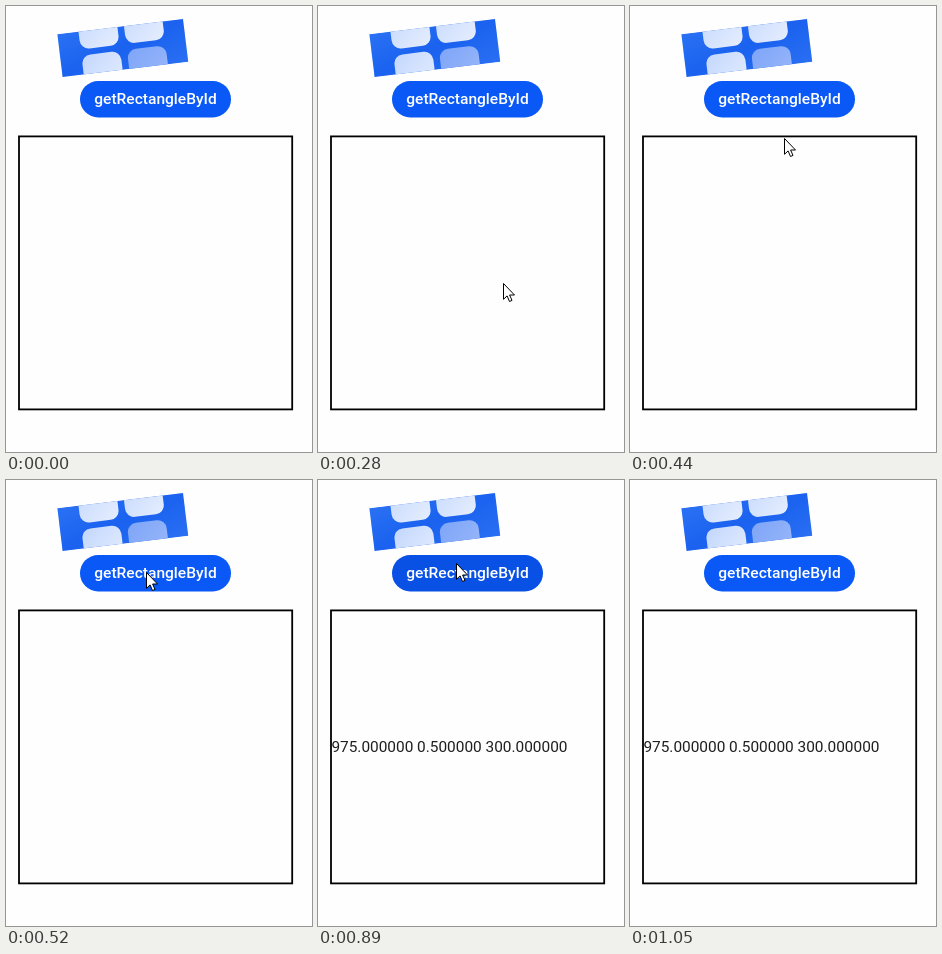
Animation, 306 px wide and 446 px high, one loop 2130 ms. Source, as an HTML page:

```html
<!DOCTYPE html>
<html lang="en">
<head>
<meta charset="utf-8">
<title>getRectangleById</title>
<style>
  html, body { margin: 0; width: 100%; height: 100%; overflow: hidden; background: #fefefe; }
  svg { display: block; width: 306px; height: 446px; }
  text { font-family: Roboto, sans-serif; }
  .caption { font-size: 15.55px; font-weight: 500; fill: #fff; text-anchor: middle; }
  .result { font-size: 15.4px; fill: #1f1f1f; }
  .button, .result, .cursor { animation: 2130ms step-end infinite; }
  .button { fill: #0a59f7; animation-name: press; }
  .result { animation-name: reveal; }
  .cursor { animation-name: travel; }

  @keyframes press {
    0% { fill: #0a59f7; }
    41.784% { fill: #0950e4; }
    43.661%, 100% { fill: #0a59f7; }
  }
  @keyframes reveal {
    0% { visibility: hidden; }
    41.784%, 100% { visibility: visible; }
  }
  /* The pointer is sampled every 40 ms, so it moves in hard steps. */
  @keyframes travel {
    0% { visibility: hidden; transform: translate(108px, 335px); }
    7.511% { visibility: visible; transform: translate(108px, 335px); }
    9.389% { visibility: visible; transform: translate(142px, 321px); }
    11.267% { visibility: visible; transform: translate(170px, 302px); }
    13.145% { visibility: visible; transform: translate(185px, 277px); }
    15.023% { visibility: visible; transform: translate(187px, 240px); }
    16.901% { visibility: visible; transform: translate(179px, 200px); }
    18.779% { visibility: visible; transform: translate(167px, 163px); }
    20.657% { visibility: visible; transform: translate(154px, 132px); }
    22.535% { visibility: visible; transform: translate(146px, 108px); }
    24.413% { visibility: visible; transform: translate(140px, 92px); }
    26.291% { visibility: visible; transform: translate(138px, 83px); }
    43.661% { visibility: visible; transform: translate(105px, 143px); }
    47.417% { visibility: visible; transform: translate(3px, 289px); }
    49.295%, 100% { visibility: hidden; transform: translate(3px, 289px); }
  }
</style>
</head>
<body>
<svg xmlns="http://www.w3.org/2000/svg" width="306" height="446">
  <defs>
    <linearGradient id="sky" x1="0" y1="0" x2="1" y2="1">
      <stop offset="0" stop-color="#2a71f4"/>
      <stop offset=".5" stop-color="#1a62ef"/>
      <stop offset="1" stop-color="#2a6ff3"/>
    </linearGradient>
    <linearGradient id="tile" x1="0" y1="0" x2="1" y2="1">
      <stop offset="0" stop-color="#c3d7fd"/>
      <stop offset="1" stop-color="#e6eefe"/>
    </linearGradient>
    <linearGradient id="glass" x1="0" y1="0" x2="1" y2="1">
      <stop offset="0" stop-color="#7ea5f8"/>
      <stop offset="1" stop-color="#9cb9fa"/>
    </linearGradient>
    <clipPath id="crop"><rect x="-63.3" y="-21.5" width="126.6" height="43"/></clipPath>
  </defs>

  <g transform="translate(116.8 42) rotate(-7)" clip-path="url(#crop)">
    <rect x="-64" y="-22" width="128" height="44" fill="url(#sky)"/>
    <g fill="url(#tile)">
      <rect x="-42" y="-42.6" width="39.2" height="39" rx="9"/>
      <rect x="3.8" y="-42.6" width="39" height="39" rx="9"/>
      <rect x="-42" y="2.4" width="39.2" height="39" rx="9"/>
    </g>
    <rect x="3.8" y="2.4" width="39" height="39" rx="9" fill="url(#glass)"/>
  </g>

  <rect class="button" x="74" y="75" width="151" height="36.4" rx="18.2"/>
  <text class="caption" x="149.5" y="98.3">getRectangleById</text>

  <rect x="13" y="130.4" width="273.2" height="273" fill="none" stroke="#000" stroke-width="1.8"/>
  <text class="result" x="13.4" y="272">975.000000 0.500000 300.000000</text>

  <path class="cursor" d="M.5 .5V16.3L4.1 12.9 6.5 18.5 9 17.4 6.6 12H11.5Z"
        fill="#fff" stroke="#000" stroke-width="1"/>
</svg>
</body>
</html>
```
